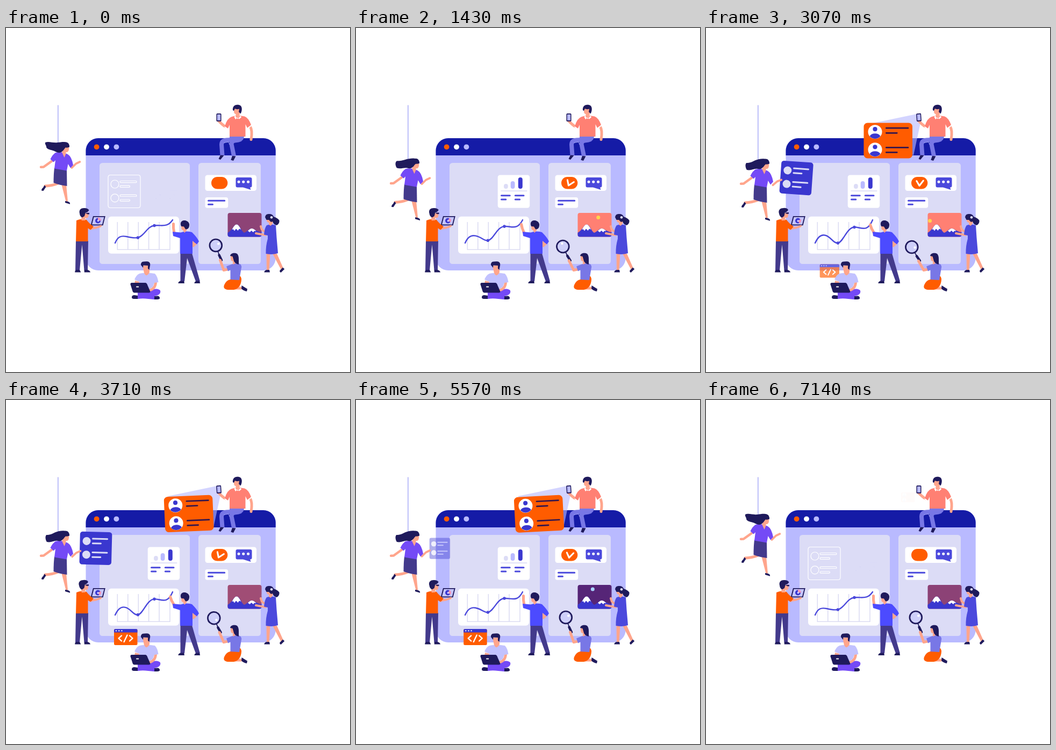
Animation, 640 px wide and 640 px high, one loop 7210 ms. Source, as an HTML page:

```html
<!DOCTYPE html>
<html lang="en">
<head>
<meta charset="utf-8">
<title>Team at a dashboard</title>
<style>
html, body { margin: 0; width: 100%; height: 100%; overflow: hidden; background: #fff; }
svg { display: block; width: 100vw; height: 100vh; }
.navy { fill: #1f1a5c; }
.indigo { fill: #433a8c; }
.skin { fill: #ffa58c; }
.orange { fill: #ff5c00; }
.white { fill: #fff; }
.panel { fill: #dcdcf6; }
.blue { fill: #3a37cf; }
.royal { fill: #4b49dc; }
.slate { fill: #7877e6; }
.violet { fill: #744af6; }
.limb, .line { fill: none; stroke-linecap: round; stroke-linejoin: round; }
.limb { stroke: #ffa58c; stroke-width: 5; }
.line { stroke-width: 3; }
#outline path { fill: none; stroke: #fff; stroke-width: 1.2; }
</style>
</head>
<body>
<svg viewBox="0 0 640 640">
  <defs>
    <clipPath id="wipe" clipPathUnits="objectBoundingBox"><polygon id="wipeEdge"/></clipPath>
    <clipPath id="photoClip"><rect x="412.5" y="344" width="63" height="44.5" rx="4"/></clipPath>
    <g id="avatar">
      <circle r="13" class="white"/>
      <circle cy="-5" r="4.1" class="blue"/>
      <path class="blue" d="M-10,8Q-7,3 0,3Q7,3 10,8A13,13 0 0 1 -10,8Z"/>
    </g>
  </defs>

  <!-- Browser window -->
  <rect x="148.5" y="205" width="353.2" height="246" rx="23" fill="#b9baff"/>
  <path d="M148.500,237V228A23,23 0 0 1 171.500,205H478.700A23,23 0 0 1 501.700,228V237Z" fill="#151ba6"/>
  <circle cx="168.600" cy="221.300" r="4.900" class="orange"/>
  <circle cx="187" cy="221.300" r="4.900" class="white"/>
  <circle cx="205.400" cy="221.300" r="4.900" fill="#b9baff"/>
  <rect x="174" y="251" width="168" height="188" rx="5.500" class="panel"/>
  <rect x="358" y="251" width="116" height="188" rx="5.500" class="panel"/>

  <g id="outline"></g>
  <g id="bars"></g>

  <!-- Line chart -->
  <rect x="190" y="350.700" width="132" height="69" rx="6" class="white"/>
  <path d="M207.300,361V412.300H305V361M226.800,361V412M246.300,361V412M265.600,361V412M285,361V412" fill="none" stroke="#dcdcf3" stroke-width="1.600"/>
  <path id="curve" class="line" stroke="#4b49dc" style="stroke-width:2.400"/>
  <circle id="dotA" cx="245.400" r="2.800" class="royal"/>
  <circle id="dotB" cx="276" r="2.800" class="royal"/>

  <!-- Messages -->
  <rect x="370.500" y="273.500" width="95.500" height="29.500" rx="4.500" class="white"/>
  <rect x="382" y="277" width="30.300" height="22.600" rx="11.300" class="orange"/>
  <path id="check" class="line" stroke="#fff" pathLength="1" d="M391.800,284.500L397,293.500L404.300,284"/>
  <path class="royal" d="M430.500,278H454.500Q457.500,278 457.500,281V294Q457,297 454,296.500L455.500,301L441,296.500H430.500Q427.500,296.500 427.500,293.500V281Q427.500,278 430.500,278Z"/>
  <g class="white"><circle cx="433" cy="286.200" r="2.500"/><circle cx="441.700" cy="286.200" r="2.500"/><circle cx="450.600" cy="286.200" r="2.500"/></g>
  <rect x="370.500" y="315" width="42.700" height="19.700" rx="4" class="white"/>
  <path class="line" stroke="#4b49dc" d="M376.500,321.300H406.700M376.500,328.200H384.500"/>

  <!-- Landscape -->
  <g clip-path="url(#photoClip)">
    <rect id="sky" x="412" y="344" width="64" height="45"/>
    <circle id="sun" r="3.500" fill="#ffd34e"/>
    <circle id="moon" r="3.500" fill="#a9d4ff"/>
    <path class="blue" d="M412,381C420,378 424,365.500 429,365.500C435,365.500 437,377 443,381C448,380 452,373 457,373C462,373 466,379 476,380V389H412Z"/>
    <path class="white" d="M420.500,375Q425,365.500 429,365.500Q433,365.500 437,375L434,373.500L431.500,377L428,373.500L425,377.500L423,374.500ZM450,377.500Q454,373 457,373Q461,373 465.500,378L462,377.500L460,380L456.500,377L453.500,380Z"/>
  </g>

  <!-- Profile card and its beam -->
  <path id="beam" d="M399,158.500L301,179L386,237L400,172Z" fill="#b9baff" fill-opacity=".62"/>
  <g id="profiles">
    <rect x="293.500" y="176.500" width="90.500" height="66" rx="7" class="orange"/>
    <use href="#avatar" x="314.500" y="193.200"/>
    <use href="#avatar" x="314.500" y="226.300"/>
    <path class="line" stroke="#34164d" style="stroke-width:2.700" d="M335.300,186.200H376M335.300,195.300H355.300M335.300,222.400H376M335.300,231.400H355.300"/>
  </g>

  <!-- Man on the window -->
  <path class="limb" d="M409,184Q403,181 394,171"/>
  <path class="limb" d="M454,183Q459,190 456,207.500"/>
  <g id="phone"><rect x="391.500" y="159" width="9" height="14.800" rx="1.500" class="navy"/><rect x="393" y="160.800" width="6" height="11" fill="#b9baff"/></g>
  <path class="line" stroke="#7877e6" stroke-linecap="butt" style="stroke-width:8;stroke-linecap:butt" d="M438,207Q420,207 419.500,216L424,238"/>
  <path class="line" stroke="#7877e6" style="stroke-width:8;stroke-linecap:butt" d="M430,207.500L410,208.500Q401,209.500 401,217L402.500,237"/>
  <path class="slate" d="M416,201H443Q443,210 433,212.500L416,215Z"/>
  <path d="M405.500,213.500L414,212L416,217" fill="none" stroke="#b9baff" stroke-width=".8"/>
  <path class="navy" d="M399,236.500L405.500,237L399,245L395.500,243.500ZM421,238L427.500,238.500L423,247L418.300,245.500Z"/>
  <path fill="#ff8073" d="M420,165L428,163L431,167L435,163L444,164.500Q451,167 456,180L449,186L445.500,179V202H416V180L413,187L407,183Q411,168 420,165Z"/>
  <path class="white" d="M426.500,163L431,169.500L436.500,163L438,166L434,169.500L431,166.500L427,170L424.500,165.500ZM407,183L413,187L412,189L406.500,185ZM449,186L456,180.500L457,182L450,188Z"/>
  <path class="skin" d="M424,149H435V157L434.500,163L431,167L427.500,163V160Q424,160 424,154Z"/>
  <path class="navy" d="M422,153C421,144 428,142 433,143C440,144 440,153 436.500,159.500L433,156L434,150.500Q429,152 426,150L424,154Z"/>

  <!-- Blue list card -->
  <g id="list">
    <rect x="136.500" y="243.500" width="59.500" height="61" rx="5" class="blue"/>
    <circle cx="149" cy="261" r="7.500" class="panel"/>
    <circle cx="149" cy="286.300" r="7.500" class="panel"/>
    <path class="line" stroke="#dcdcf6" d="M160.500,256.300H187.500M160.500,265H175.500M160.500,281.800H187.500M160.500,290.500H175.500"/>
  </g>

  <!-- Woman on the rope -->
  <path id="rope" stroke="#aeb0f8" stroke-width="1.600"/>
  <g id="climber">
    <path class="limb" style="stroke-width:4.500" d="M86,247L70,258.500L65,258.800"/>
    <path class="limb" id="reach" style="stroke-width:3.800" d="M122.500,260L130,252.500L137.300,249"/>
    <path class="limb" d="M97,289Q86,293.500 73,294"/>
    <path class="skin" d="M103,290L112,291L115,322.500L111.500,323Z"/>
    <path class="navy" d="M71.500,292.500L74.500,295.500L69.500,303L66,302.500Q66,299 69,297ZM110,322L114,322.500Q120,324 119,327.700L110,325Z"/>
    <path class="indigo" d="M90,260L113,263L113.500,294Q100,292.500 88.500,288Q88.500,272 90,260Z"/>
    <path class="violet" d="M92,232Q103,229 115,235Q122,239 125,255L120,260.500L115.500,253L113,265.500L90,261.500L92,246L88.500,249.500L82.500,244Q87,235 92,232Z"/>
    <path class="skin" d="M105,221L116.500,217.500Q118.500,229 114,231H111.500V234L108.500,241L104.500,232Z"/>
    <path id="hair" class="navy"/>
    <path class="navy" d="M104,223C103,214 109,211 114,213Q118.500,216 118,221.500Q113,223.500 110.500,222L106.500,228Z"/>
  </g>

  <!-- Man with tablet -->
  <path class="indigo" d="M130,396H153L152,451H145.500L141.500,403L137,451H129Z"/>
  <path class="navy" d="M128.200,454.500Q128,450 132,450H137L139.300,454.500ZM145.700,454.500V450H151Q156,450.500 157,454.500Z"/>
  <path class="navy" d="M162,350H184.800L180.500,367.300H157.500Z"/>
  <path d="M163.500,351.800H182.500L179,365.500H160Z" fill="#c6c6ff"/>
  <g id="donut"><circle cx="171" cy="358.500" r="5" class="blue"/><path d="M171,358.500V352.500A6,6 0 0 1 177,358.500Z" fill="#f797b5"/><circle cx="171.500" cy="358.500" r="1.900" fill="#c6c6ff"/></g>
  <path class="limb" style="stroke-width:4" d="M156,373.500L168,371.500L176,368.500"/>
  <path class="orange" d="M131,358Q140,353.500 150,357Q154,363 163,369.500L157.500,375.500L152.500,372.500V397H130Z"/>
  <g id="reader">
    <path class="skin" d="M140,347L153,343Q155,352 151,353.500H147.500V358H140.500Z"/>
    <path class="navy" d="M137,345C135,337 141,334.500 146,335Q152,335 154.500,339Q152,343 148,343.500L146,350L142,352.500Q137.500,351 137,345Z"/>
    <path d="M147.500,344H155V346.500H151.500Z" class="navy"/>
  </g>

  <!-- Code window -->
  <g id="code">
    <rect x="201" y="425.500" width="43.500" height="30" rx="2.500" class="orange"/>
    <path class="blue" d="M201,432V428Q201,425.500 203.500,425.500H242Q244.500,425.500 244.500,428V432Z"/>
    <g fill="#dcdcf6"><circle cx="205" cy="428.800" r="1.300"/><circle cx="210.200" cy="428.800" r="1.300"/><circle cx="215.400" cy="428.800" r="1.300"/></g>
    <path class="line" stroke="#fff" style="stroke-width:2.400" d="M215,438L209.500,443L215,448M225.500,437L219.500,449.500M230,438L235.500,443L230,448"/>
  </g>

  <!-- Man with laptop -->
  <path class="navy" d="M234,501Q234,497 239,497L246,498V504H238Q234,504 234,501ZM275,499L283,498.500Q286.500,500 286,503.500Q284,505.500 275,505Z"/>
  <path class="violet" d="M266,488C277,484 287,485 287.300,490C287.500,496 281,498 276,499V505C264,504 256,502 245,504V491Z"/>
  <path class="limb" d="M278.500,473Q278,485 267,488"/>
  <path class="skin" d="M240,470L249,472L246,476H239Z"/>
  <path fill="#c2c2ff" d="M248,457Q262,454 277,457Q282,462 283.500,473L276,474L273,482L266,486H246L248,472L239,468Q242,460 248,457Z"/>
  <path class="skin" d="M254,442H267V453Q267,456 265.500,457Q261,464 257,456Z"/>
  <path class="navy" d="M251,441Q250.500,434 258,434.500Q269,433 268.200,441L266.500,450L264,447.500V442L255.500,441.500L255,446Z"/>
  <path class="navy" d="M234,474H259Q262,474 263.500,479L268.300,490Q269,492.500 265,492.500H239Q236,492.500 235,488L231.500,477Q231,474 234,474Z"/>
  <rect x="242" y="480.500" width="5.200" height="2" rx="1" class="white"/>

  <!-- Presenting man -->
  <path class="indigo" d="M324.500,419H346L361,471.500H353L337,428L332,471.500H324.500Z"/>
  <path class="navy" d="M320.300,475Q321,471 325,470.500H331L332,475ZM350.300,475Q351,471 355,470.500H360L361.200,475Z"/>
  <g id="pointer"><path class="limb" d="M313,382L311.500,372V364.500"/></g>
  <path class="limb" style="stroke-width:4" d="M354,400L348.500,405.500V398"/>
  <path fill="#4c4bff" d="M310,379L325,380.500Q335,377 346,380Q356,390 359,397L355,402.500L347,396V420H324V391L311,387Z"/>
  <path class="skin" d="M326,366H338L336,377L332,381L329,376Q325.500,376 326,366Z"/>
  <path class="navy" d="M325,366C324,359 330,357 335,358.500Q342,361 341,368Q340,375 334,374.500L331,369.500L326,369Z"/>

  <!-- Kneeling woman -->
  <g id="lens">
    <path class="line" stroke="#1f1a5c" style="stroke-width:4.500" d="M396.500,422.500L401,432"/>
    <path stroke="#1f1a5c" stroke-width="1.800" d="M394,415L396.500,422"/>
    <circle cx="390.300" cy="404.400" r="11.400" fill="#cecffa" stroke="#1f1a5c" stroke-width="2.700"/>
    <circle id="glint" r="2.200" class="white"/>
    <path class="limb" d="M405,450L398.500,432"/>
  </g>
  <path class="limb" d="M405,450.500L412,449"/>
  <path class="limb" d="M426,484H437"/>
  <path class="navy" d="M438.500,479L449,485.500L448,490Q441,488.500 438,485Z"/>
  <path class="orange" d="M417,468Q410,469 406,478Q403,486 413,487H424Q437,484 438,468Q438,463 434,460Z"/>
  <path class="slate" d="M410,443.500L424,438Q437,436 438.300,444L434,469L417.500,468V450L413,452.500Z"/>
  <path class="skin" d="M418,424H427L427,438L422,440V434Q417,434 418,424Z"/>
  <path class="navy" d="M417,424C418,418 426,418 430,420Q433,423 433,430V440Q424,438 423,430L421.500,425Z"/>

  <!-- Woman at the picture -->
  <path class="limb" style="stroke-width:4" d="M483,385L473,383.500L465,382"/>
  <path class="limb" style="stroke-width:4" d="M481.500,379L476,375L474,369"/>
  <path class="skin" d="M484.500,420H491.500L489.500,451H485ZM496,420H504L515.500,446L511.500,449Z"/>
  <path class="navy" d="M480.300,454.500Q481,450.500 485,450H490L491,454.500ZM515,445.500L518.200,448.500L511.500,455Q508.500,454 509.500,451Z"/>
  <path class="royal" d="M485,367Q493,364 502,367L503.500,390L506,419Q496,422.500 483.500,420Q483,406 487,392V386L480,384.500Q481,372 485,367Z"/>
  <path class="skin" d="M484.500,353H496V364L492.500,368L489,366V362Q484,362 484.500,353Z"/>
  <path class="navy" d="M482,352Q483,345 490,346Q496,346 498,351Q506,354 508.500,358Q509,364 504,367Q498,366 496,360L493,361L489,357L484.500,357Z"/>
  <circle cx="494" cy="352.300" r="2.400" class="panel"/>
</svg>
<script>
const LOOP = 7210;
const TAU = Math.PI * 2;
const $ = id => document.getElementById(id);
const set = (id, attrs) => { for (const k in attrs) $(id).setAttribute(k, attrs[k]); };
const mix = (a, b, p) => a + (b - a) * p;
const smooth = p => p * p * (3 - 2 * p);
const linear = p => p;

// Value at time t from steps of [time, value].
function at(t, steps, ease = smooth) {
  if (t <= steps[0][0]) return steps[0][1];
  for (let i = 1; i < steps.length; i++) {
    const [t0, a] = steps[i - 1], [t1, b] = steps[i];
    if (t <= t1) return mix(a, b, ease((t - t0) / (t1 - t0)));
  }
  return steps[steps.length - 1][1];
}
const inOut = (t, a, b, c, d) => at(t, [[a, 0], [b, 1], [c, 1], [d, 0]]);

// Blends the numbers of two paths with the same commands.
function blend(from, to, p) {
  const goal = to.match(/-?[\d.]+/g);
  let i = 0;
  return from.replace(/-?[\d.]+/g, n => mix(+n, +goal[i++], p).toFixed(2));
}

const circle = (x, y, r) => `M${x},${y - r}a${r},${r} 0 1 1 0,${2 * r}a${r},${r} 0 1 1 0,${-2 * r}`;
const pill = (x, y, w, h) => {
  const r = h / 2, half = w / 2 - r;
  return `M${x + w / 2},${y}h${half}a${r},${r} 0 0 1 0,${h}h${-2 * half}a${r},${r} 0 0 1 0,${-h}z`;
};
const outlines = ['M250,278V330Q250,334.500 245.500,334.500H194.500Q190,334.500 190,330V278Q190,273.500 194.500,273.500H245.500Q250,273.500 250,278'];
for (const y of [290.5, 316.3]) {
  outlines.push(circle(202.5, y, 7.5), pill(212, y - 6, 31, 3.2), pill(212, y + 2.7, 18.5, 3.2));
}
$('outline').innerHTML = outlines.map(d => `<path pathLength="1" d="${d}"/>`).join('');

const bar = (x, y, w, h, r, fill) =>
  `<rect x="${x}" y="${y}" width="${w}" height="${h}" rx="${r}" fill="${fill}" clip-path="url(#wipe)"/>`;
$('bars').innerHTML = [
  bar(263.7, 273.5, 59.5, 61.2, 4.5, '#fff'),
  bar(275, 290, 7.8, 9, 3.9, '#dcdcf6'),
  bar(287.7, 285, 7.8, 14, 3.9, '#b9baff'),
  bar(301.8, 278, 8, 21, 3.9, '#3a37cf'),
  bar(269, 302.4, 49.5, 1.3, .6, '#cfcff5'),
  ...[269, 294.8].flatMap(x => [bar(x, 310.3, 18.7, 3, 1.5, '#4b49dc'), bar(x, 317.6, 11.3, 3, 1.5, '#4b49dc')])
].join('');

const hairs = [
  'M117,216C113,210 104,212 96,213C86,214 80,210 73,213C72,217 76,219 75,222C79,228 86,226 92,230C98,233 104,233 107,226Z',
  'M118,219C114,210 104,213 97,211C90,209 86,202 78,203C71,205 73,212 75,215C79,221 86,222 92,227C97,230 104,231 107,226Z',
  'M117,217C112,210 100,212 92,215C86,218 82,220 75,220C72,224 74,230 76,233C84,235 90,230 96,231C100,232 104,232 107,226Z'
];
const calm = 'M203,400C208,388 214,386 224,388C236,391 240,391 245.400,390C258,387 262,369 276,367.500C290,366 300,372 310,357';
const wavy = 'M203,400C208,389 214,384 221,385.500C232,387 236,401 245.400,400C255,399 262,371 276,370.500C288,370 300,382 310,357';

const grow = (x, y, s) => `translate(${x} ${y}) scale(${s}) translate(${-x} ${-y})`;

function draw(t) {
  // Rope descent
  const dy = at(t, [[0, 0], [450, 12], [790, 23], [1500, 31], [5950, 31], [6600, 14], [7130, 0]], linear);
  const swing = inOut(t, 2250, 3070, 3150, 4100);
  set('rope', { d: `M96.800,143.500V${(dy < 25 ? 213 : 216) + dy}` });
  set('climber', { transform: `translate(0 ${dy})` });
  set('reach', { transform: `rotate(${5 * swing} 122 260) translate(${2 * swing} ${swing})` });
  const flow = at(t, [[0, 0], [790, 1], [1650, 2], [6000, 2], [7130, 0]]);
  const h = Math.min(1, Math.floor(flow));
  set('hair', { d: blend(hairs[h], hairs[h + 1], flow - h) });

  // Cards
  const list = inOut(t, 1600, 2100, 5250, 6050);
  set('list', {
    transform: `translate(${1.5 * swing} ${3 * swing}) rotate(${4 * swing} 137 280) ${grow(137, 280, list)}`,
    opacity: Math.max(0, list * 1.7 - .7)
  });
  const trim = at(t, [[0, 1], [100, 1], [1050, 0], [6250, 0], [7050, 1]], linear);
  $('outline').style.strokeDasharray = `${trim} 2`;
  $('outline').style.visibility = trim > 0 ? 'visible' : 'hidden';
  const edge = 1 - 2 * at(t, [[350, 0], [1200, 1], [6200, 1], [7000, 0]], linear);
  set('wipeEdge', { points: `${edge - 2},-2 ${edge + 3},3 6,3 6,-2` });

  const show = inOut(t, 2450, 3020, 6250, 7210);
  const full = at(t, [[6250, 1], [7140, .28], [7210, .2]]);
  const tilt = at(t, [[3070, 0], [4300, -4.6], [5570, -3], [6300, 0]]);
  set('profiles', {
    transform: `${grow(390, 170, t < 4000 ? show : full)} rotate(${tilt} 384 177)`,
    opacity: show
  });
  set('beam', { transform: grow(397, 165, show), opacity: show });
  set('phone', { transform: `rotate(${-4 * inOut(t, 2450, 3000, 6300, 7000)} 396 166)` });
  const code = inOut(t, 2550, 3330, 5950, 6900);
  set('code', {
    transform: `translate(${-.8 * inOut(t, 4430, 5570, 5600, 6000)} ${.4 * code}) ${grow(265, 508, mix(.35, 1, code))}`,
    opacity: Math.max(0, code * 1.4 - .4)
  });

  // Chart
  const wave = at(t, [[0, 0], [790, .3], [2140, .78], [3070, 1], [4430, .9], [5570, .5], [7140, 0]], linear);
  set('curve', { d: blend(calm, wavy, wave) });
  set('dotA', { cy: mix(390, 400, wave) });
  set('dotB', { cy: mix(367.5, 370.5, wave) });
  set('pointer', { transform: `rotate(${-20 * inOut(t, 900, 1800, 4600, 5500)} 313 382)` });

  // Check mark
  const tick = at(t, [[300, 0], [750, 1], [6300, 1], [6900, 0]]);
  set('check', {
    'stroke-dasharray': `${tick} 2`,
    visibility: tick > 0 ? 'visible' : 'hidden',
    transform: `rotate(${10 * (1 - Math.cos(TAU * (t - 790) / 1140))} 397.500 288.500)`
  });

  // Day and night
  const night = at(t, [[0, .52], [650, 0], [3300, 0], [4250, 1], [4900, 1], [5570, .77], [7140, .525]], linear);
  const sky = [[255, 36], [128, 10], [115, 120]].map(([day, dark]) => Math.round(mix(day, dark, night)));
  set('sky', { fill: `rgb(${sky})` });
  for (const [id, start] of [['sun', 0], ['moon', 3640]]) {
    const x = 480.5 - (t - start) * .0208;
    set(id, { cx: x, cy: 352 + .009 * (x - 444) ** 2 });
  }

  // Magnifier and tablet
  set('lens', { transform: `rotate(${at(t, [[0, 0], [790, -4.2], [1900, -8.8], [3070, -9.5], [4250, 0]], linear)} 405.500 451)` });
  const angle = at(t, [[0, -31], [790, -149], [2140, -37], [3070, 18], [4430, 71], [5570, -31]]) * TAU / 360;
  set('glint', { cx: 390.3 + 5.8 * Math.cos(angle), cy: 404.4 + 5.8 * Math.sin(angle) });
  const nod = inOut(t, 0, 2900, 4300, 7140);
  set('reader', { transform: `rotate(${-5 * nod} 144 356)` });
  set('donut', { transform: `rotate(${60 * nod} 171 358.500)` });
}

const began = performance.now();
function tick(now) {
  draw(Math.max(0, now - began) % LOOP);
  requestAnimationFrame(tick);
}
draw(0);
requestAnimationFrame(tick);
</script>
</body>
</html>
```
